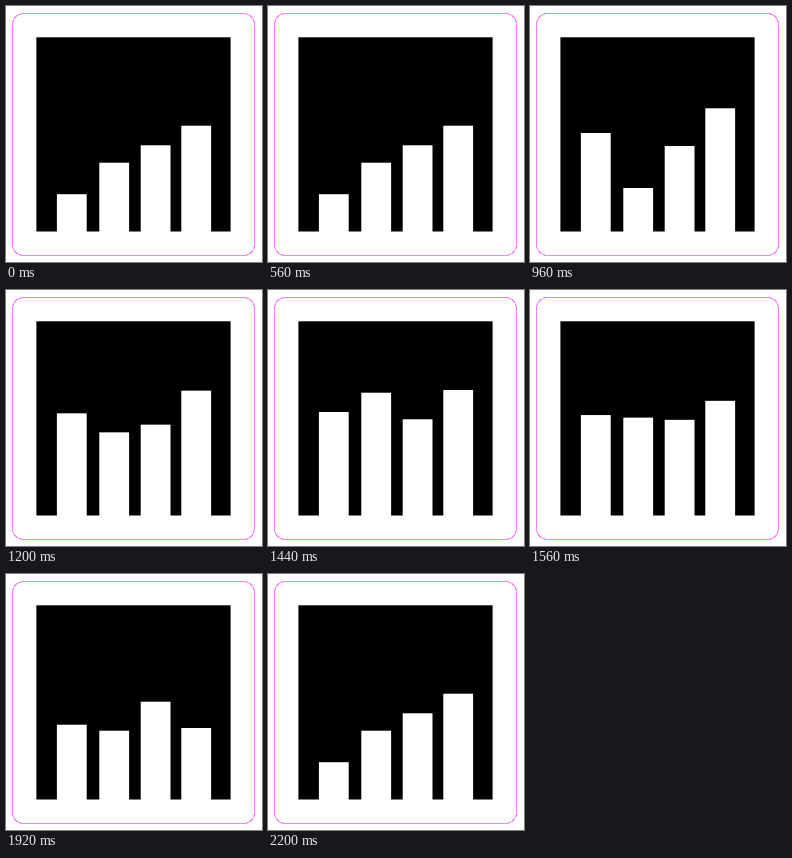
An HTML page that plays this animation: 256 px wide and 256 px high, repeating every 3.92 s.

```html
<!DOCTYPE html>
<html lang="en">
<head>
<meta charset="utf-8">
<title>Bar chart</title>
<style>
  html, body { margin: 0; width: 100%; height: 100%; overflow: hidden; background: #fff; }
  svg { display: block; width: 100vw; height: 100vh; }
</style>
</head>
<body>
<svg viewBox="0 0 256 256">
  <rect x="6.5" y="7.5" width="242" height="242" rx="11" fill="#fff" stroke="#ff80ff" shape-rendering="crispEdges"/>
  <rect x="30.4" y="31.3" width="194.2" height="194.2"/>
  <g id="bars" fill="#fff"></g>
</svg>
<script>
const LOOP = 3920, START = 560, STEP = 40, BASE = 226, BAR_WIDTH = 29.8;
const LEFTS = [50.9, 93.3, 134.7, 175.3];

// Poses of the four bar tops, and the step at which each is reached.
const rest = { step: 0, tops: [188.2, 156.7, 139.3, 119.7] };
const poses = [
  rest,
  { step: 10, tops: [127, 182, 140, 102.3] },
  { step: 22, tops: [122, 102.7, 129.3, 100] },
  { step: 29, tops: [134, 166, 130.7, 135.5] },
  { step: 34, tops: [150.7, 156.7, 127.7, 154] },
  { ...rest, step: 41 }
];
const lastPose = poses.length - 1;
const lastStep = poses[lastPose].step;

const group = document.getElementById('bars');
const bars = LEFTS.map(left => {
  const bar = document.createElementNS('http://www.w3.org/2000/svg', 'rect');
  bar.setAttribute('x', left);
  bar.setAttribute('width', BAR_WIDTH);
  return group.appendChild(bar);
});

const slope = (bar, i) =>
  (poses[i + 1].tops[bar] - poses[i].tops[bar]) / (poses[i + 1].step - poses[i].step);

// Harmonic mean of the neighbouring slopes, flat at turning points.
function tangent(bar, i) {
  if (i === 0 || i === lastPose) return 0;
  const before = slope(bar, i - 1), after = slope(bar, i);
  return before * after <= 0 ? 0 : 2 * before * after / (before + after);
}

function topAt(bar, step) {
  let i = 0;
  while (i < lastPose - 1 && step >= poses[i + 1].step) i++;
  const from = poses[i], to = poses[i + 1];
  const span = to.step - from.step, u = (step - from.step) / span, v = 1 - u;
  return from.tops[bar] * v * v * (1 + 2 * u) + to.tops[bar] * u * u * (3 - 2 * u)
    + span * u * v * (v * tangent(bar, i) - u * tangent(bar, i + 1));
}

function draw(time) {
  const elapsed = Math.floor((time % LOOP - START) / STEP);
  const step = Math.max(0, Math.min(elapsed, lastStep));
  bars.forEach((bar, i) => {
    const top = topAt(i, step);
    bar.setAttribute('y', top);
    bar.setAttribute('height', BASE - top);
  });
}

const begin = performance.now();
function tick() {
  draw(performance.now() - begin);
  requestAnimationFrame(tick);
}
tick();
</script>
</body>
</html>
```
